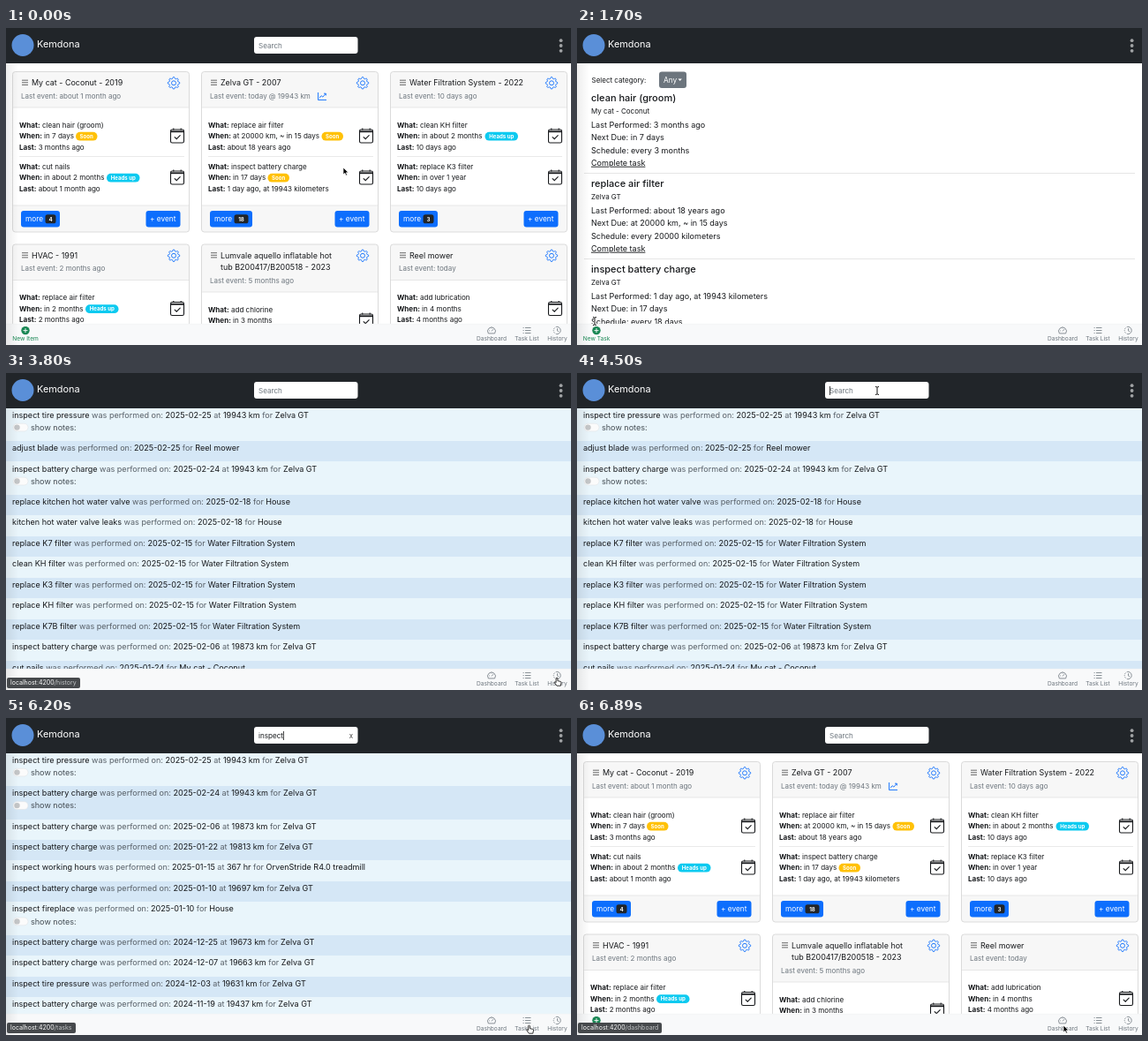
Recreate the animation shown at these times as an HTML page. Size 640 by 359 pixels, loop 7.08 s.

```html
<!DOCTYPE html>
<html lang="en">
<head>
<meta charset="utf-8">
<title>Household task tracker</title>
<style>
html, body { margin: 0; width: 100%; height: 100%; overflow: hidden; background: #fff; }
#stage { position: relative; width: 640px; height: 359px; overflow: hidden; }
svg { display: block; font-family: Inter, "Open Sans", sans-serif; }
text { white-space: pre; }
.b { font-weight: 700; }
#edge {
  position: absolute; left: 0; top: 40px; width: 14px; bottom: 0;
  background: linear-gradient(90deg, rgba(0, 0, 0, .07), transparent);
}
#status {
  position: absolute; left: 1px; bottom: 2px; height: 12px; padding: 0 4px;
  font: 7px/12px Inter, "Open Sans", sans-serif; white-space: pre;
  color: #fff; background: #46494c; border-radius: 2px;
}
#status span { color: #c0c3c5; }
#cursor { position: absolute; left: 0; top: 0; }
</style>
</head>
<body>
<div id="stage">
  <svg id="view" width="640" height="359"></svg>
  <div id="edge"></div>
  <div id="status"></div>
  <svg id="cursor" width="640" height="359"></svg>
</div>
<script>
const LOOP = 7080;
const INK = '#16181b', DARK = '#212529', GRAY = '#6c757d', BLUE = '#0d6efd', GREEN = '#198754';
const $ = id => document.getElementById(id);

// Drawing helpers; the y of a text is its middle.
const text = (x, y, size, str, fill = INK, more = '') =>
  `<text x="${x}" y="${(y + .36 * size).toFixed(2)}" font-size="${size}" fill="${fill}" ${more}>${str}</text>`;
const rect = (x, y, w, h, fill, r = 0, more = '') =>
  `<rect x="${x}" y="${y}" width="${w}" height="${h}" rx="${r}" fill="${fill}" ${more}/>`;
const line = (d, color, w = 1, more = '') =>
  `<path d="${d}" fill="none" stroke="${color}" stroke-width="${w}" ${more}/>`;
const dot = (x, y, r, fill, more = '') => `<circle cx="${x}" cy="${y}" r="${r}" fill="${fill}" ${more}/>`;
const at = (x, y, body) => `<g transform="translate(${x} ${y})">${body}</g>`;
const bold = str => `<tspan class="b">${str}</tspan>`;
const MEDIUM = 'font-weight="500"', CENTER = 'text-anchor="middle"';

const gearPath = 'M' + Array.from({ length: 64 }, (_, i) => {
  const a = i * Math.PI / 32;
  const r = 5.9 + .8 * Math.max(-1, Math.min(1, 2 * Math.cos(8 * a)));
  return `${(r * Math.cos(a)).toFixed(2)} ${(r * Math.sin(a)).toFixed(2)}`;
}).join('L') + 'Z';
const gear = (x, y) => at(x, y, line(gearPath, BLUE, .9) + dot(0, 0, 2.5, 'none', `stroke="${BLUE}" stroke-width=".9"`));

const calendar = (x, y) => at(x, y,
  rect(-7.5, -7, 15, 15, 'none', 1.8, `stroke="${INK}" stroke-width="1.1"`) +
  line('M-7-4.7H7', INK, 1.8) + line('M-4.2-8.5v2M4.2-8.5v2', INK, 1.1) +
  line('M-2.9 1.6L-.8 3.7 3.2-.4', INK, 1.1, 'stroke-linecap="round"'));

const caretDown = (x, y) => `<path d="M${x} ${y - 1.1}h4.4l-2.2 2.4z" fill="#fff"/>`;
const button = (x, y, w, label, fill, tx = x + 5) => rect(x, y, w, 18.5, fill, 3) + text(tx, y + 9.2, 8.3, label, '#fff');

const BADGES = { Soon: ['#ffc107', 24.5], 'Heads up': ['#0dcaf0', 37.5] };
const badge = (x, y, label) => {
  const [fill, w] = BADGES[label];
  return rect(x, y - 4.9, w, 9.8, fill, 4.9) + text(x + w / 2, y, 6.1, label, '#fff', CENTER + ' class="b"');
};

// Page frame
const header = rect(0, 0, 640, 40, DARK) + dot(19, 19.5, 12.5, '#5a8fd8') +
  text(35, 18.1, 10.9, 'Kemdona', '#fff') +
  [14.2, 20, 25.8].map(y => dot(628.6, y, 1.9, '#a0a2a4')).join('');

const navItem = (x, label, icon) => at(x, 342.5, icon) + text(x, 352, 6.6, label, GRAY, CENTER);
const nav = add => rect(0, 335, 640, 24, '#f8f9fa') + line('M0 335.2H640', '#eceeef', .5) +
  (add ? dot(22, 342.6, 4.7, GREEN) + line('M19.5 342.6h5M22 340.1v5', '#fff', .9) +
    text(22, 352, 6.6, add, GREEN, CENTER) : '') +
  navItem(550, 'Dashboard', line('M-3.6 3.4A4.4 4.4 0 1 1 3.6 3.4ZM0 .9L2-1.3M-2.8.4h.8M0-3v.8', GRAY, .8)) +
  navItem(590, 'Task List', line('M-2-3H4.5M-2 0H4.5M-2 3H4.5M-4.4-3h1.1M-4.4 0h1.1M-4.4 3h1.1', GRAY, .8)) +
  navItem(624.5, 'History', line('M-1.4-4.1A4.2 4.2 0 1 1-1.4 4.1M0-2.3V.3L1.7 1.4', GRAY, .8) +
    line('M-2.2-3.6A4.2 4.2 0 0 0-2.2 3.6', GRAY, .8, 'stroke-dasharray="1 .8"'));

// Dashboard
function card(x, y, titles, sub, items, more) {
  const head = 40.5 + 13.5 * (titles.length - 1), height = 181.5;
  let s = rect(x, y, 200, height, '#fff', 3) +
    rect(x, y, 200, head, '#f7f7f7', 3) +
    line(`M${x} ${y + head}h200`, '#d9d9d9', .6);
  s += line(`M${x + 10.5} ${y + 9.7}h7m-7 2.6h7m-7 2.6h7`, '#444', .8);
  titles.forEach((t, i) => s += text(x + 21.5, y + 12.5 + 13.5 * i, 8.95, t));
  s += text(x + 9.5, y + head - 13, 8, sub, GRAY) + gear(x + 182.5, y + 12.8);
  items.forEach(([what, when, last, label, bx], i) => {
    const ty = y + head + 20 + 47 * i;
    [['What:', what], ['When:', when], ['Last:', last]].forEach(([k, v], n) =>
      s += text(x + 7.5, ty + 12.4 * n, 8.05, bold(k) + ' ' + v));
    if (label) s += badge(bx, ty + 12.7, label);
    if (i) s += line(`M${x + 7.5} ${ty - 11.5}h187`, '#dcdcdc', .6);
    s += calendar(x + 186.5, ty + 12);
  });
  if (more) {
    const fy = y + 151.5, w = more.length * 4 + 9;
    s += rect(x, fy, 200, 30, '#f7f7f7', 3) + line(`M${x} ${fy}h200`, '#d9d9d9', .6) +
      button(x + 9.5, fy + 6, w + 31, 'more', BLUE, x + 14.5) +
      rect(x + 37, fy + 10.3, w - 1, 10, DARK, 2.6) +
      text(x + 36.5 + w / 2, fy + 15.3, 6.2, more, '#fff', CENTER + ' class="b"') +
      button(x + 151, fy + 6, 39, '+ event', BLUE, x + 155.5);
  }
  return s + rect(x, y, 200, height, 'none', 3, 'stroke="#d2d2d2" stroke-width=".8"');
}

const dash = header + [
  card(7.5, 49.5, ['My cat - Coconut - 2019'], 'Last event: about 1 month ago', [
    ['clean hair (groom)', 'in 7 days', '3 months ago', 'Soon', 79],
    ['cut nails', 'in about 2 months', 'about 1 month ago', 'Heads up', 114]], '4'),
  card(221.5, 49.5, ['Zelva GT - 2007'], 'Last event: today @ 19943 km', [
    ['replace air filter', 'at 20000 km, ~ in 15 days', 'about 18 years ago', 'Soon', 357.5],
    ['inspect battery charge', 'in 17 days', '1 day ago, at 19943 kilometers', 'Soon', 296.5]], '18'),
  card(435.5, 49.5, ['Water Filtration System - 2022'], 'Last event: 10 days ago', [
    ['clean KH filter', 'in about 2 months', '10 days ago', 'Heads up', 542.5],
    ['replace K3 filter', 'in over 1 year', '10 days ago']], '3'),
  card(7.5, 245, ['HVAC - 1991'], 'Last event: 2 months ago', [
    ['replace air filter', 'in 2 months', '2 months ago', 'Heads up', 90]]),
  card(221.5, 245, ['Lumvale aquello inflatable hot', 'tub B200417/B200518 - 2023'], 'Last event: 5 months ago', [
    ['add chlorine', 'in 3 months', '5 months ago']]),
  card(435.5, 245, ['Reel mower'], 'Last event: today', [
    ['add lubrication', 'in 4 months', '4 months ago']])
].join('') + line('M353.5 73v8.5h9.5M355 79.3l2.2-2.6 1.7 1.4 3.3-3.8M360 74.2h2.3v2.3', BLUE, .9) + nav('New Item');

// Task list
const TASKS = [
  ['clean hair (groom)', 'My cat - Coconut', '3 months ago', 'in 7 days', 'every 3 months'],
  ['replace air filter', 'Zelva GT', 'about 18 years ago', 'at 20000 km, ~ in 15 days', 'every 20000 kilometers'],
  ['inspect battery charge', 'Zelva GT', '1 day ago, at 19943 kilometers', 'in 17 days', 'every 18 days']
];
const tasks = header + text(16.5, 58.7, 8, 'Select category:') +
  button(93, 49.5, 31, 'Any', GRAY) + caretDown(114.5, 58.7) +
  TASKS.map(([name, item, last, due, plan], i) => {
    const y = 79 + 97 * i;
    return text(16, y, 11, name, INK, MEDIUM) + text(16, y + 15, 8, item) +
      text(16, y + 31, 9.04, 'Last Performed: ' + last) +
      text(16, y + 45.2, 9.04, 'Next Due: ' + due) +
      text(16, y + 59.3, 9.04, 'Schedule: ' + plan) +
      text(16, y + 73.5, 9.04, 'Complete task', INK, 'text-decoration="underline"') +
      line(`M8 ${y + 85.5}H632`, '#dcdcdc', .7);
  }).join('') + nav('New Task');

// New task form
const add = header + text(7, 51.7, 11, 'Add new task', INK, MEDIUM) +
  button(7, 63.5, 86.5, 'please select item', GRAY) + caretDown(83.5, 72.7) +
  rect(107.5, 63.8, 139, 18, '#fff', 3, 'stroke="#a9d5b9" stroke-width="2.2"') +
  rect(107.5, 63.8, 139, 18, '#fff', 3, 'stroke="#3f9b6b" stroke-width=".8"') +
  text(112.5, 72.8, 8.2, 'name', GRAY) + text(251, 72.8, 9, 'every') +
  rect(279.5, 63.8, 39, 18, '#fff', 3, 'stroke="#d8dce0" stroke-width=".8"') +
  text(284.5, 72.8, 8.2, 'units', GRAY) +
  button(324, 63.5, 56.5, 'select unit', GRAY) + caretDown(371.5, 72.7) +
  rect(385.5, 63.5, 20, 18.5, '#ffc107', 3) +
  rect(391, 69.3, 9, 7, 'none', 1, `stroke="${INK}" stroke-width=".8"`) +
  line('M392.8 71.5h5.4M392.8 72.9h5.4M392.8 74.3h3.6', INK, .6) +
  text(9, 88.2, 8.08, 'Or create new item', BLUE) +
  button(608, 108, 28, 'save', GREEN);

// History: action, date, reading, item, has notes
const CAR = 'Zelva GT', WATER = 'Water Filtration System';
const BATTERY = 'inspect battery charge', TIRE = 'inspect tire pressure';
const LOG = [
  [TIRE, '2025-02-25', '19943 km', CAR, 1],
  ['adjust blade', '2025-02-25', '', 'Reel mower'],
  [BATTERY, '2025-02-24', '19943 km', CAR, 1],
  ['replace kitchen hot water valve', '2025-02-18', '', 'House'],
  ['kitchen hot water valve leaks', '2025-02-18', '', 'House'],
  ...['replace K7', 'clean KH', 'replace K3', 'replace KH', 'replace K7B']
    .map(a => [a + ' filter', '2025-02-15', '', WATER]),
  [BATTERY, '2025-02-06', '19873 km', CAR],
  ['cut nails', '2025-01-24', '', 'My cat - Coconut'],
  [BATTERY, '2025-01-22', '19813 km', CAR],
  ['inspect working hours', '2025-01-15', '367 hr', 'OrvenStride R4.0 treadmill'],
  [BATTERY, '2025-01-10', '19697 km', CAR],
  ['inspect fireplace', '2025-01-10', '', 'House', 1],
  [BATTERY, '2024-12-25', '19673 km', CAR],
  [BATTERY, '2024-12-07', '19663 km', CAR],
  [TIRE, '2024-12-03', '19631 km', CAR],
  [BATTERY, '2024-11-19', '19437 km', CAR]
];
const dim = str => `<tspan fill="#575f67">${str}</tspan>`;
function history(query) {
  let y = 39.5, s = '';
  LOG.filter(row => row[0].includes(query)).forEach(([action, date, reading, item, notes], i) => {
    const h = notes ? 37.5 : 23.45;
    s += rect(0, y, 640, h, i % 2 ? '#d5e7f6' : '#e9f5fb', 0, 'shape-rendering="crispEdges"') +
      text(7, y + 7.8, 9.06, action + dim(' was performed on: ') + date +
        (reading && dim(' at ') + reading) + dim(' for ') + item);
    if (notes) s += rect(8, y + 17.7, 17, 8.8, '#fbfbfb', 4.4, 'stroke="#dfe3e6" stroke-width=".6"') +
      dot(12.5, y + 22.1, 3.2, '#c3c5c7') + text(28, y + 22, 9.06, 'show notes:', '#444c53');
    y += h;
  });
  return s + header + nav();
}

const search = query => rect(281, 10, 117.5, 19, '#fff', 3) +
  text(286, 19.8, 8.1, query || 'Search', query ? INK : GRAY, 'id="query"') +
  (query ? text(391, 20, 8, 'x', '#444', CENTER) : '');

// Timelines: [start, value]
const SCENES = [[0, 'dash'], [900, 'tasks'], [2300, 'add'], [3200, 'dash'], [3800, 'hist'], [6300, 'tasks'], [6890, 'dash']];
const QUERY = [[0, ''], [4700, 'i'], [4800, 'ins'], [4900, 'insp'], [5000, 'inspec'], [5100, 'inspect'], [6300, '']];
const CARET = [[0, 0], [4500, 1], [5200, 0], [5500, 1], [5800, 0], [6100, 1], [6300, 0]];
const LINK = [[0, null], [700, '/tasks'], [1000, null], [1900, '/add-task'], [2400, null], [2900, ''],
  [3300, null], [3600, '/history'], [4000, null], [5200, '/item-actions-manager/0VO4RLLpO'], [5400, null],
  [6100, '/tasks'], [6500, '/dashboard']];
const FADE = [[0, 1], [5300, .3], [5400, 1]];
const PATH = [
  [0, 382, 158, 'arrow'], [700, 590, 347, 'hand'], [1000, 590, 347, 'arrow'], [1700, 20, 332, 'beam'],
  [1900, 22, 342, 'hand'], [2400, 22, 342, 'arrow'], [2900, 71, 19, 'hand'], [3300, 71, 19, 'arrow'],
  [3700, 624, 345, 'hand'], [4000, 624, 345, 'arrow'], [4300, 340, 20, 'beam'], [4700, 340, 20, 'none'],
  [5200, 312, 45, 'hand'], [5300, 231, 52, 'beam'], [5500, 231, 52, 'arrow'], [6100, 592.5, 348, 'hand'],
  [6300, 592.5, 348, 'hand'], [6500, 551, 348, 'arrow']
];
const BEAM = 'M-2-4.5Q0-4.5 0-3.5Q0-4.5 2-4.5M0-3.5V3.5M-2 4.5Q0 4.5 0 3.5Q0 4.5 2 4.5';
const CURSORS = {
  arrow: '<path d="M0 0v8l1.9-1.7 1.2 2.8 1.4-.6-1.2-2.7h2.6z" fill="#000" stroke="#fff" stroke-width=".7"/>',
  hand: '<path d="M-.9.6q.9-1.2 1.8 0v3l3.2.8q1 .3.9 1.4l-.7 3.4h-4.4l-2.6-3.6q-.2-1 .9-.8l.9.8z" fill="#fff" stroke="#000" stroke-width=".8"/>',
  beam: line(BEAM, '#fff', 2) + line(BEAM, '#111', 1),
  none: ''
};

const indexAt = (table, t) => table.findLastIndex(row => row[0] <= t);
const valueAt = (table, t) => table[indexAt(table, t)][1];

function cursorAt(t) {
  const i = indexAt(PATH, t), [t0, x0, y0, kind] = PATH[i];
  const [t1, x1, y1] = PATH[i + 1] || [LOOP, x0, y0];
  const p = (t - t0) / (t1 - t0), e = p * p * (3 - 2 * p);
  return at(x0 + (x1 - x0) * e, y0 + (y1 - y0) * e, CURSORS[kind]);
}

function draw(t) {
  const scene = valueAt(SCENES, t), query = valueAt(QUERY, t), link = valueAt(LINK, t);
  const page = { dash, tasks, add }[scene] || history(query);
  $('view').innerHTML = page + (scene === 'dash' || scene === 'hist' ? search(query) : '');
  if (valueAt(CARET, t)) {
    const x = 286 + (query ? $('query').getComputedTextLength() : 0);
    $('view').insertAdjacentHTML('beforeend', rect(x, 15, .8, 10, '#111'));
  }
  const status = $('status');
  status.style.display = link === null ? 'none' : 'block';
  status.style.opacity = valueAt(FADE, t);
  status.innerHTML = `localhost:4200<span>${link || ''}</span>`;
  $('cursor').innerHTML = cursorAt(t);
}

// The picture changes ten times a second and rests before the last page.
let shown = -1;
function tick(now) {
  const t = now % LOOP;
  const step = t >= 6890 ? 6890 : Math.min(6600, Math.floor(t / 100) * 100);
  if (step !== shown) draw(shown = step);
  requestAnimationFrame(tick);
}
tick(performance.now());
</script>
</body>
</html>
```
